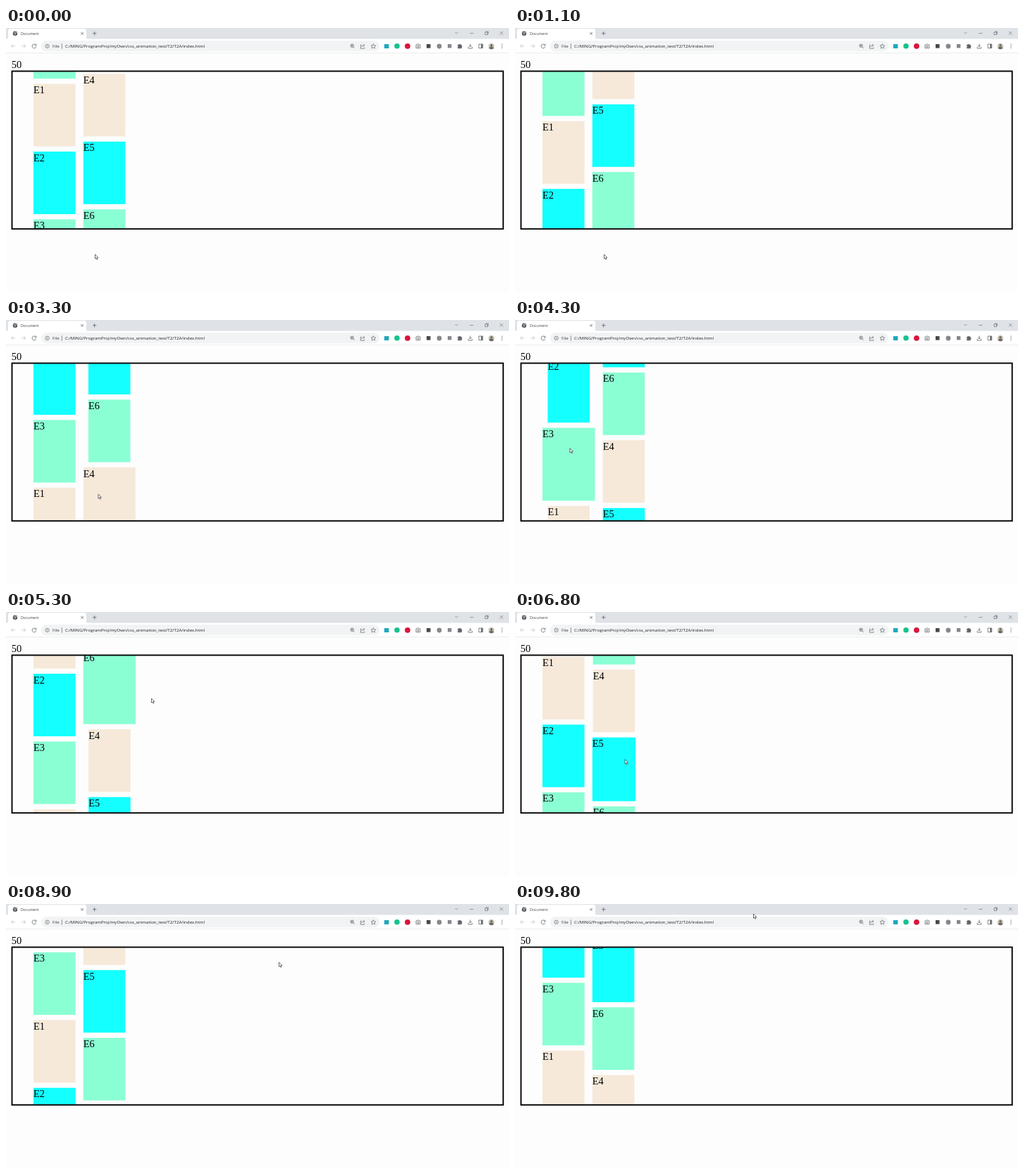
Animation, 714 px wide and 376 px high, one loop 9900 ms. Source, as an HTML page:

```html
<!DOCTYPE html>
<html lang="en">
<head>
<meta charset="utf-8">
<title>Scrolling columns</title>
<style>
  html, body { margin: 0; width: 100%; height: 100%; overflow: hidden; background: #fdfdfd; }
  svg { display: block; }
  .ui { font-family: "Open Sans", "Noto Sans", sans-serif; fill: #3c4043; }
  .page { font: 14.4px "Liberation Serif", serif; fill: #000; }
  .icon { fill: none; stroke: #5f6368; stroke-width: .8; }
</style>
</head>
<body>
<svg width="714" height="376" viewBox="0 0 714 376">
  <defs><clipPath id="inside"><rect x="9" y="62" width="696" height="223.5"/></clipPath></defs>

  <!-- Browser window -->
  <rect width="714" height="16" fill="#dfe2e7"/>
  <path d="M0 16Q3 16 3 13V4Q3 1 6 1H111Q114 1 114 4V13Q114 16 117 16Z" fill="#fff"/>
  <rect y="15.5" width="714" height="20" fill="#fff"/>
  <rect y="35" width="714" height=".7" fill="#e6e7e9"/>
  <rect x="50" y="18" width="480" height="15.5" rx="7.75" fill="#f1f3f4"/>

  <circle cx="13" cy="7.7" r="3.2" fill="#4d5156"/>
  <path d="M10.8 6.5l2 .6 .6 1.5-1 1.4M13.5 5.2l.6 1.3 1.6.4" stroke="#fff" stroke-width=".8" fill="none"/>
  <g class="ui">
    <text x="21" y="9.8" font-size="5.25">Document</text>
    <text x="66" y="28.2" font-size="6.15">File</text>
    <text x="84" y="28.2" font-size="6.15" fill="#202124">C:/MING/ProgramProj/myOwn/css_animation_test/T2/T2A/index.html</text>
  </g>

  <g class="icon">
    <path d="M106.4 6.1l3.4 3.4m0-3.4l-3.4 3.4M123 7.7h5.4M125.7 5v5.4"/>
    <path d="M637.5 6l2 2 2-2M658.5 7.5h5M680 6h3.5v3.5H680zM681.2 6V5h3.3v3.3h-1M701 5l4.6 4.6m0-4.6l-4.6 4.6" stroke-width=".6"/>
    <path d="M13.2 25.8H7.6m2.7-2.7l-2.7 2.7 2.7 2.7M22.2 25.8h5.6m-2.7-2.7l2.7 2.7-2.7 2.7" stroke="#c3c5c8"/>
    <path d="M42.4 24.2a2.9 2.9 0 1 0 .4 2.4M43 22.6v2.2h-2.2"/>
    <circle cx="58.6" cy="25.8" r="2.7" stroke-width=".7"/>
    <path d="M58.6 25.3v2.1M58.6 24v.8M79.3 22.2v7.4" stroke-width=".7"/>
    <circle cx="491.2" cy="25.2" r="2.2"/>
    <path d="M492.8 26.8l2 2M490 25.2h2.4M491.2 24v2.4" stroke-width=".7"/>
    <path d="M505 24.2h-1.6v5h5.4v-1.6M505 27.2q.3-2.6 3.8-2.6m-1.5-1.7l1.8 1.7-1.8 1.7" stroke-width=".7"/>
    <path d="M521.4 22.6l1 2.2 2.4.2-1.8 1.6.6 2.4-2.2-1.3-2.2 1.3.6-2.4-1.8-1.6 2.4-.2z" stroke-width=".7"/>
    <path d="M582 24h1.4l.7-1h1.8l.7 1h1.4v4.6h-6z"/><circle cx="585" cy="26.2" r="1.1"/>
    <path d="M641.6 24h1.6q.8-2 1.6 0h1.6v1.6q2 .8 0 1.6v1.6h-4.8v-1.6q1.4-.8 0-1.6z" fill="#5f6368"/>
    <path d="M659 22.6v4m-2-1.8l2 2 2-2M656.2 27v2h5.6v-2"/>
    <path d="M671.2 23h5.6v5.6h-5.6z"/><path d="M675.4 23v5.6" stroke-width="2.2"/>
  </g>
  <rect x="537" y="23" width="6.5" height="6" fill="#22a7bd"/>
  <circle cx="555" cy="25.8" r="3.8" fill="#15c38c"/>
  <circle cx="570" cy="25.8" r="3.9" fill="#d8163d"/>
  <rect x="597" y="23" width="5.6" height="5.6" fill="#48494c"/>
  <circle cx="615" cy="26" r="3.4" fill="#85888c"/>
  <rect x="627" y="23" width="5.4" height="5.4" fill="#85888c"/>
  <circle cx="689" cy="26" r="4.2" fill="#c9c3b6"/>
  <path d="M685.5 28.4q3.5-4.5 7 0a4.2 4.2 0 0 1-7 0z" fill="#6d6a5e"/>
  <circle cx="689" cy="24.6" r="1.6" fill="#6d6a5e"/>
  <path d="M704 23.2v.1m0 2.4v.1m0 2.4v.1" stroke="#5f6368" stroke-width="1.3" stroke-linecap="round"/>

  <!-- Page -->
  <text class="page" x="7.8" y="56.8">50</text>
  <g id="items" class="page" clip-path="url(#inside)"></g>
  <rect x="8.5" y="61.5" width="697.2" height="224.7" fill="none" stroke="#000" stroke-width="1.9"/>
  <path id="cursor" d="M0 0V6.2L1.4 5 2.4 7.2 3.4 6.7 2.5 4.6H4.4Z" fill="#fff" stroke="#333" stroke-width=".7"/>
</svg>

<script>
const LOOP = 9900, STEP = 100;
const SPEED = 48.3, PITCH = 96.5, WIDTH = 59.6, HEIGHT = 89.1;
const GROWTH = 14.85, TRANSITION = 0.4;
const COLORS = ['#f6e9d9', '#14ffff', '#8affd3'];

// Hovering pauses a column and enlarges one item.
const left = {
  start: 79.5, direction: 1, labels: ['E1', 'E2', 'E3'],
  hovers: [{ from: 3.53, to: 4.66, item: -1 }],
};
const right = {
  start: 65.3, direction: -1, labels: ['E4', 'E5', 'E6'],
  hovers: [
    { from: 3, to: 3.5, item: 3 },
    { from: 4.68, to: 5.29, item: 2 },
    { from: 6.755, to: 7.15, item: 4 },
  ],
};

// Cursor path: time, x, y
const path = [
  [0, 126.5, 322.5], [2.75, 126.5, 322.5], [3.3, 131, 248], [3.5, 111, 238],
  [3.8, 80, 215], [4.2, 72, 190], [4.5, 90, 168], [4.67, 116, 150],
  [5, 172, 122], [5.2, 190, 119], [5.3, 206.5, 123], [5.9, 255, 154],
  [6.4, 208, 186], [6.8, 156, 210], [7, 162, 207], [7.15, 185, 202],
  [8, 254, 191], [8.5, 357, 127], [8.9, 387.5, 83], [9.4, 370, 45], [9.8, 338.5, 14],
];

const items = document.getElementById('items');
const cursor = document.getElementById('cursor');
const clamp = (v, lo, hi) => Math.min(hi, Math.max(lo, v));

// CSS "ease": cubic-bezier(.25, .1, .25, 1)
function ease(p) {
  if (p <= 0 || p >= 1) return clamp(p, 0, 1);
  let lo = 0, hi = 1, u;
  for (let i = 0; i < 20; i++) {
    u = (lo + hi) / 2;
    if (0.75 * u * (1 - u) + u ** 3 < p) lo = u; else hi = u;
  }
  return 0.3 * u * (1 - u) ** 2 + 3 * u * u * (1 - u) + u ** 3;
}

const growth = (h, t) =>
  GROWTH * (ease((t - h.from) / TRANSITION) - ease((t - h.to) / TRANSITION));

function drawColumn(column, x, t) {
  const grown = column.hovers.map(h => ({ item: h.item, size: growth(h, t) }));
  const paused = column.hovers.reduce((sum, h) => sum + clamp(t, h.from, h.to) - h.from, 0);
  const widest = Math.max(...grown.map(g => g.size));
  const sumWhere = test => grown.reduce((sum, g) => sum + (test(g.item) ? g.size : 0), 0);
  const top = column.start + column.direction * SPEED * (t - paused);
  let svg = '';
  for (let n = -6; n < 9; n++) {
    const y = top + n * PITCH + sumWhere(i => i < n);
    const extra = sumWhere(i => i === n);
    if (y > 287 || y + HEIGHT + extra < 60) continue;
    const itemX = x + (widest - extra) / 2, kind = (n + 9) % 3;
    svg += `<rect x="${itemX}" y="${y}" width="${WIDTH + extra}" height="${HEIGHT + extra}" fill="${COLORS[kind]}"/>
      <text x="${itemX}" y="${y + 13.6}">${column.labels[kind]}</text>`;
  }
  return { svg, widest };
}

function cursorAt(t) {
  const i = clamp(path.findIndex(p => p[0] > t), 0, path.length) || path.length - 1;
  const [t0, x0, y0] = path[i - 1], [t1, x1, y1] = path[i];
  const p = clamp((t - t0) / (t1 - t0), 0, 1);
  return [x0 + (x1 - x0) * p, y0 + (y1 - y0) * p];
}

function render(now) {
  const t = Math.floor((now % LOOP) / STEP) * STEP / 1000;
  const first = drawColumn(left, 39, t);
  const second = drawColumn(right, 109.8 + first.widest, t);
  items.innerHTML = first.svg + second.svg;
  cursor.setAttribute('transform', `translate(${cursorAt(t)})`);
}

const began = performance.now();
function tick() {
  render(performance.now() - began);
  requestAnimationFrame(tick);
}
tick();
</script>
</body>
</html>
```
